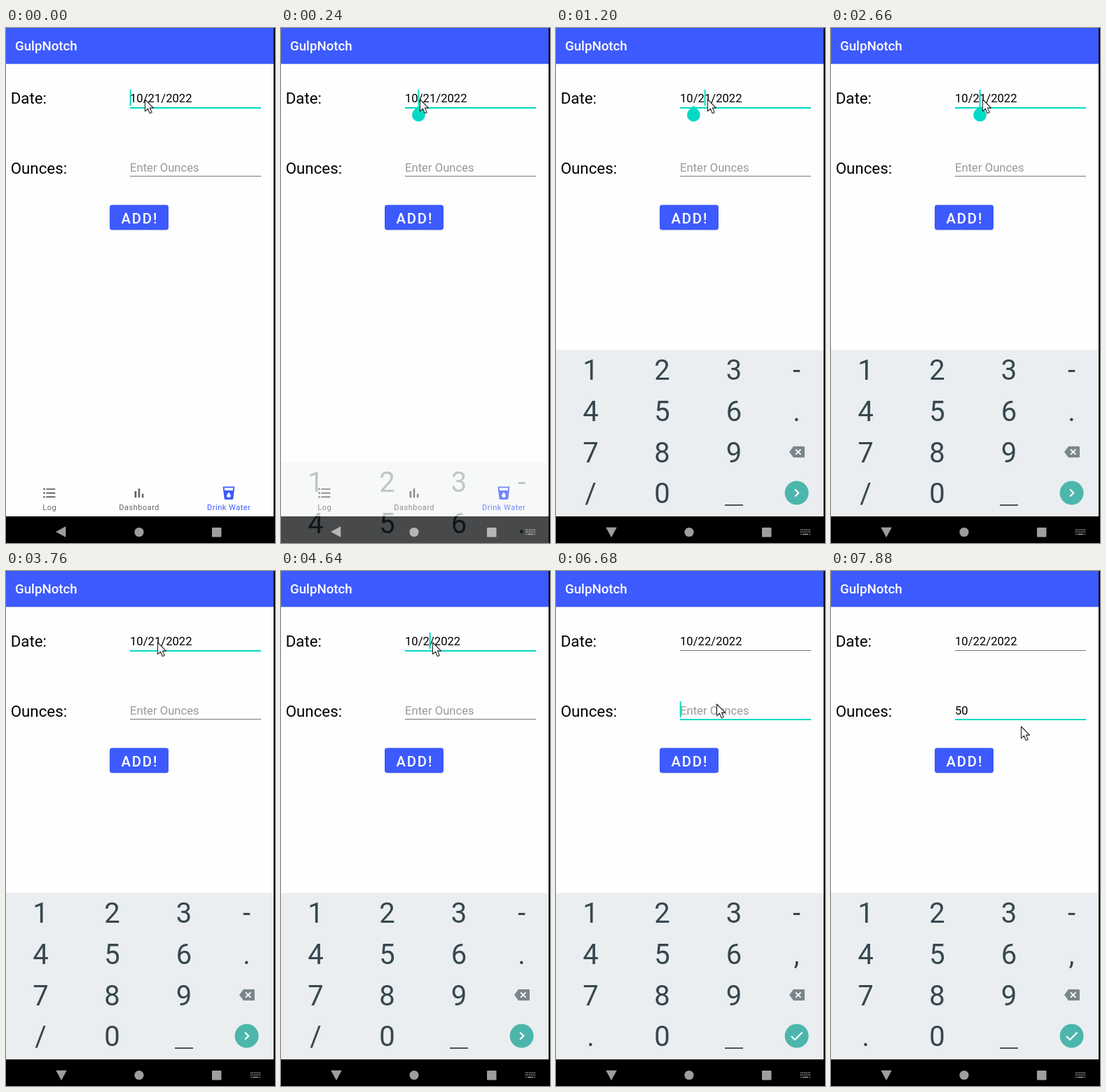
These frames come from a looping animation (384 px wide and 735 px high, 8000 ms). An HTML page:

```html
<!DOCTYPE html>
<html lang="en">
<head>
<meta charset="utf-8">
<title>Drink water form</title>
<style>
html, body { margin: 0; width: 100%; height: 100%; overflow: hidden; background: #000; }
svg { display: block; width: 384px; height: 735px; font-family: Roboto, sans-serif; }
text { white-space: pre; }
.label { font-size: 22.3px; }
.field { font-size: 16.65px; }
.tab { font-size: 11px; letter-spacing: .5px; text-anchor: middle; }
.key { font-size: 40px; text-anchor: middle; fill: #37474f; }
</style>
</head>
<body>
<svg viewBox="0 0 384 735">
  <rect width="384" height="735" fill="#fefefe"/>
  <rect y="51" width="384" height="1" fill="#c9cff5"/>
  <rect width="384" height="51" fill="#3d5afe"/>
  <text x="13" y="32" font-size="18.7" font-weight="500" fill="#fff">GulpNotch</text>

  <text class="label" x="6.7" y="108">Date:</text>
  <text class="label" x="6.7" y="208">Ounces:</text>
  <rect id="dateLine" x="177" y="113" width="187"/>
  <rect id="ouncesLine" x="177" y="211" width="187"/>
  <text id="date" class="field" x="177" y="106"></text>
  <text id="ounces" class="field" x="177" y="204.5"></text>
  <rect id="caret" width="2" height="23" fill="#03dac5"/>
  <path id="handle" fill="#03dac5" d="M0-13.3L6.65-6.65A9.4 9.4 0 1 1-6.65-6.65Z"/>

  <rect x="148.5" y="254" width="83" height="35.3" rx="4" fill="#d5d8e6"/>
  <rect x="148" y="252.6" width="84" height="35.4" rx="3.5" fill="#3d5afe"/>
  <text x="164.5" y="278.5" font-size="20.3" font-weight="500" letter-spacing="1.8" fill="#fff">ADD!</text>

  <g fill="#666">
    <g transform="translate(62 663.7) scale(.93) translate(-12 -12)">
      <path d="M7 5h14v2H7zM7 11h14v2H7zM7 17h14v2H7z"/>
      <circle cx="4" cy="6" r="1.5"/><circle cx="4" cy="12" r="1.5"/><circle cx="4" cy="18" r="1.5"/>
    </g>
    <path transform="translate(190 663.7) scale(.93) translate(-12 -12)" d="M5 9.2h3V19H5zM10.6 5h2.8v14h-2.8zM16.2 13H19v6h-2.8z"/>
    <text class="tab" x="62.2" y="688">Log</text>
    <text class="tab" x="190.2" y="688">Dashboard</text>
  </g>
  <g fill="#3d5afe">
    <path transform="translate(318 663.7) scale(.93) translate(-12 -12)" fill-rule="evenodd" d="M3 2L5 20.2Q5.2 22 7 22H17Q18.8 22 19 20.2L21 2ZM12 19A3 3 0 0 1 9 16C9 14 12 10.6 12 10.6S15 14 15 16A3 3 0 0 1 12 19ZM18.3 8H5.7L5.2 4H18.8Z"/>
    <text class="tab" x="318.2" y="688">Drink Water</text>
  </g>

  <rect y="697" width="384" height="38"/>
  <g fill="#9e9e9e">
    <path id="back" d="M-7.5 0L6-7.3V7.3Z" stroke="#9e9e9e" stroke-width=".6" stroke-linejoin="round"/>
    <circle cx="190" cy="719.5" r="6.6"/>
    <rect x="294" y="713" width="13.5" height="13.5" rx="1"/>
    <g id="imeIcon" fill="none" stroke="#9e9e9e" stroke-width="1.6">
      <path d="M349 716.3h14M349 719.3h14" stroke-dasharray="1.5 1"/>
      <path d="M349 722.5h1.5m1.5 0h8m1.5 0h1.5"/>
    </g>
  </g>

  <g id="keyboard">
    <rect y="459" width="384" height="1" fill="#f4f6f7"/>
    <rect y="460" width="384" height="237" fill="#eaeef1"/>
    <g id="keys"></g>
    <rect x="241" y="680" width="26" height="1.8" fill="#37474f"/>
    <path d="M333 605L339 597H353.5Q355 597 355 598.5V611.5Q355 613 353.5 613H339Z" fill="#7b868c"/>
    <path d="M342 601.3l7.4 7.4m0-7.4l-7.4 7.4" stroke="#fff" stroke-width="1.8"/>
    <circle cx="343.6" cy="663.5" r="17" fill="#4db6ac"/>
    <path id="action" fill="none" stroke="#fff" stroke-width="2.2"/>
  </g>

  <path id="pointer" d="M0 0V16.8L4 13.2L6.8 19.7L9.7 18.4L7 12.1H12Z" fill="#fff" stroke="#222" stroke-width="1.1" stroke-linejoin="round"/>
  <rect x="382" width="2" height="735"/>
</svg>
<script>
const LOOP = 8000, TICK = 120, BLINK = 490, TEAL = '#03dac5';
const $ = id => document.getElementById(id);
const set = (id, attrs) => { for (const k in attrs) $(id).setAttribute(k, attrs[k]); };
const show = (id, on) => { $(id).style.display = on ? '' : 'none'; };

// What the user does; each entry changes part of the form state.
const actions = [
  { at: -BLINK * 2, field: 'date', date: '10/21/2022', ounces: '', index: 0 },
  { at: 120, index: 2, tapped: true },
  { at: 1200, index: 4 },
  { at: 3270, index: 5, tapped: false },
  { at: 4640, index: 4, date: '10/2/2022' },
  { at: 5010, index: 5, date: '10/22/2022' },
  { at: 6200, index: 0, field: 'ounces' },
  { at: 7050, index: 1, ounces: '5' },
  { at: 7290, index: 2, ounces: '50' },
];
const stateAt = t => Object.assign({}, ...actions.filter(a => a.at <= t));

// Progress from 0 to 1, advancing once per tick.
const progress = (t, start, duration) =>
  Math.min(1, Math.max(0, Math.floor((t - start) / TICK) * TICK / duration));
const smooth = p => p * p * (3 - 2 * p);
const easeOut = p => 1 - (1 - p) ** 2;

const moves = [
  { start: 600, duration: 240, dx: 18, dy: 0 },
  { start: 5500, duration: 600, dx: 13, dy: 88 },
  { start: 7640, duration: 240, dx: 42, dy: 32 },
];
function pointerAt(t) {
  let x = 198.5, y = 102;
  for (const { start, duration, dx, dy } of moves) {
    const p = easeOut(progress(t, start, duration));
    x += dx * p;
    y += dy * p;
  }
  return [x, y];
}

const columns = [49.5, 151.5, 254, 343.5];
const keys = ['123-', '456.', '789', '/0'].map((row, r) => [...row].map((char, c) => {
  const key = document.createElementNS('http://www.w3.org/2000/svg', 'text');
  key.setAttribute('class', 'key');
  key.setAttribute('x', columns[c]);
  key.setAttribute('y', 502.3 + r * 58.6);
  key.textContent = char;
  return $('keys').appendChild(key);
}));

const caretX = ({ field, index }) =>
  176.7 + (index && $(field).getSubStringLength(0, index));

const underline = (id, focused) =>
  set(id, { height: focused ? 2 : 1, fill: focused ? TEAL : '#777' });

function draw(t) {
  const state = stateAt(t), previous = stateAt(t - TICK);
  const inOunces = state.field === 'ounces';

  $('date').textContent = state.date;
  $('ounces').textContent = state.ounces || 'Enter Ounces';
  set('ounces', { fill: state.ounces ? '#000' : '#999' });
  underline('dateLine', !inOunces);
  underline('ouncesLine', inOunces);

  show('caret', Math.floor((t - state.at) / BLINK) % 2 === 0);
  set('caret', { x: caretX(state), y: inOunces ? 186 : 88 });
  show('handle', previous.tapped);
  set('handle', { transform: `translate(${caretX(previous) + 1} 124)` });
  set('pointer', { transform: `translate(${pointerAt(t)})` });

  const slide = smooth(progress(t, 120, 290));
  const turn = smooth(progress(t, 240, 220));
  set('keyboard', { transform: `translate(0 ${255 * (1 - slide)})`, opacity: Math.min(1, 2.2 * slide ** 2) });
  set('back', { transform: `translate(79 719) rotate(${-90 * turn})` });
  show('imeIcon', slide > 0);

  // The key layout follows the focused field one tick later.
  const numberPad = previous.field === 'ounces';
  keys[1][3].textContent = numberPad ? ',' : '.';
  keys[3][0].textContent = numberPad ? '.' : '/';
  set('action', { d: numberPad ? 'M336 664l5 5l10.5-10.5' : 'M341.2 658.5l5 5l-5 5' });
}

function frame() {
  draw(performance.now() % LOOP);
  requestAnimationFrame(frame);
}
frame();
</script>
</body>
</html>
```
